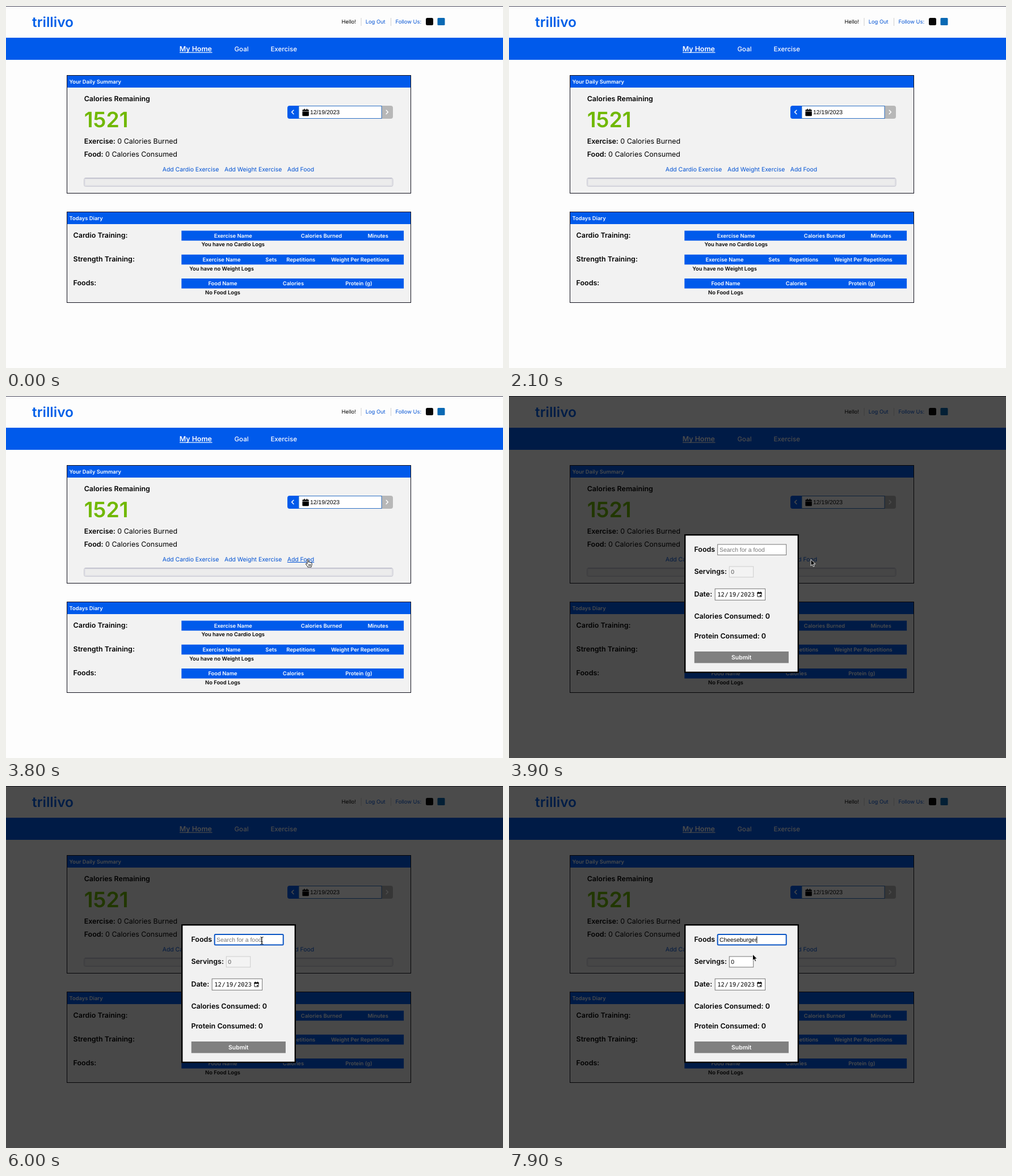
Recreate the animation shown at these times as an HTML page. Size 876 px wide and 639 px high, loop 8 s.

```html
<!DOCTYPE html>
<html lang="en">
<head>
<meta charset="utf-8">
<title>Calorie diary</title>
<style>
  html, body { margin: 0; width: 100%; height: 100%; overflow: hidden; background: #fdfdfd; }
  svg { display: block; width: 876px; height: 639px; }
  text { font: 400 12.48px Inter, sans-serif; fill: #000; text-rendering: geometricPrecision; }
  .b, .b text { font-weight: 600; }
  .s, .s text { font-size: 9.36px; }
  .m, .m text { font-size: 10.4px; }
  .c, .c text { text-anchor: middle; }
  .w, .w text { fill: #fff; }
  .link, .link text { fill: #0052d4; }
  .blue { fill: #005aeb; }
  .field { font-family: "Liberation Sans", Arial, sans-serif; font-size: 10.4px; }
  .mono { font-family: "DejaVu Sans Mono", monospace; font-size: 10.4px; }
  .box { fill: #fff; stroke: #767676; stroke-width: 1; }
  .panel { fill: #f2f2f2; stroke: #10101c; stroke-width: 1; }
  .chev { fill: none; stroke: #fff; stroke-width: 1.5; stroke-linecap: round; stroke-linejoin: round; }
</style>
</head>
<body>
<svg viewBox="0 0 876 639">
  <rect width="876" height="639" fill="#fdfdfd"/>
  <rect width="876" height="1" fill="#47475a"/>

  <g id="header">
    <text class="b" x="46" y="37" style="font-size:24.5px;fill:#005fe8">trillivo</text>
    <g class="s">
      <text x="591.5" y="30.8">Hello!</text>
      <g class="link">
        <text x="633.7" y="30.8">Log Out</text>
        <text x="686.6" y="30.8">Follow Us:</text>
      </g>
    </g>
    <path d="M626 21V35M678.5 21V35" stroke="#cfcfcf"/>
    <rect x="740" y="21" width="13" height="13" rx="2.5" fill="#060606"/>
    <rect x="760.5" y="21" width="13" height="13" rx="1.5" fill="#0a69b4"/>
  </g>

  <g id="nav">
    <rect class="blue" y="56" width="876" height="39"/>
    <text class="b w" x="305.7" y="80" style="font-size:12.4px">My Home</text>
    <rect x="306" y="81.4" width="57.5" height="1.2" fill="#fff"/>
    <g class="w" style="font-weight:500">
      <text x="402.5" y="80" style="font-size:11.5px;font-weight:500">Goal</text>
      <text x="466.4" y="80" style="font-size:11.5px;font-weight:500">Exercise</text>
    </g>
  </g>

  <g id="summary">
    <rect class="panel" x="107.5" y="122.5" width="606" height="208"/>
    <rect class="blue" x="108" y="123" width="605" height="21"/>
    <text class="b s w" x="111.6" y="137">Your Daily Summary</text>
    <text class="b" x="137.7" y="168">Calories Remaining</text>
    <text class="b" x="137.7" y="214" style="font-size:37.44px;fill:#70b800">1521</text>
    <text x="137.7" y="242.6"><tspan class="b">Exercise:</tspan> 0 Calories Burned</text>
    <text x="137.7" y="266"><tspan class="b">Food:</tspan> 0 Calories Consumed</text>
    <g class="m link">
      <text x="275.8" y="292">Add Cardio Exercise</text>
      <text x="385" y="292">Add Weight Exercise</text>
      <text id="addFood" x="495.8" y="292">Add Food</text>
    </g>
    <g fill="none">
      <rect x="137" y="303" width="545.5" height="16" rx="3" fill="#ececec"/>
      <rect x="139" y="305" width="541.5" height="12" rx="2" stroke="#e1e1e6" stroke-width="2"/>
      <rect x="137.5" y="303.5" width="544.5" height="15" rx="3" stroke="#c9c9d3"/>
      <path d="M139 304H680" stroke="#b4b4c4"/>
    </g>
    <path class="blue" d="M517 176H500a4 4 0 0 0-4 4V195a4 4 0 0 0 4 4H517z"/>
    <path d="M661 176H678a4 4 0 0 1 4 4V195a4 4 0 0 1-4 4H661z" fill="#b7b7b7"/>
    <rect x="516" y="176.5" width="146" height="22" fill="#fff" stroke="#2b6fc4"/>
    <path class="chev" d="M506.8 184L503.6 187.3L506.8 190.6M670.2 184L673.4 187.3L670.2 190.6"/>
    <path d="M523.6 183H525V181.4H526.6V183H529.6V181.4H531.2V183H532.6a1.2 1.2 0 0 1 1.2 1.2V185.4H522.4V184.2a1.2 1.2 0 0 1 1.2-1.2zM522.4 186.2H533.8V193a1.2 1.2 0 0 1-1.2 1.2H523.6a1.2 1.2 0 0 1-1.2-1.2z"/>
    <text class="field" x="536" y="191.2">12/19/2023</text>
  </g>

  <g id="diary">
    <rect class="panel" x="107.5" y="363.5" width="606" height="160"/>
    <rect class="blue" x="108" y="364" width="605" height="21"/>
    <text class="b s w" x="111.6" y="377.6">Todays Diary</text>
    <g class="b">
      <text x="118.6" y="409">Cardio Training:</text>
      <text x="118.6" y="451.2">Strength Training:</text>
      <text x="118.6" y="493.4">Foods:</text>
    </g>
    <g class="blue">
      <rect x="309.3" y="396.6" width="391.8" height="17.6"/>
      <rect x="309.3" y="438.8" width="391.8" height="17.6"/>
      <rect x="309.3" y="481" width="391.8" height="17.6"/>
    </g>
    <g class="b s c w">
      <text x="400.3" y="408.8">Exercise Name</text>
      <text x="556" y="408.8">Calories Burned</text>
      <text x="655.6" y="408.8">Minutes</text>
      <text x="380" y="451">Exercise Name</text>
      <text x="467.3" y="451">Sets</text>
      <text x="519.8" y="451">Repetitions</text>
      <text x="624.4" y="451">Weight Per Repetitions</text>
      <text x="382" y="493.2">Food Name</text>
      <text x="506.4" y="493.2">Calories</text>
      <text x="621.8" y="493.2">Protein (g)</text>
    </g>
    <g class="b s c">
      <text x="400.3" y="424.4">You have no Cardio Logs</text>
      <text x="380" y="466.6">You have no Weight Logs</text>
      <text x="382" y="508.8">No Food Logs</text>
    </g>
  </g>

  <g id="modal">
    <rect width="876" height="639" fill="#000" opacity=".7"/>
    <rect x="310.2" y="245.2" width="199.6" height="242.6" fill="#f1f1f1" stroke="#000" stroke-width="2.4"/>
    <g class="b">
      <text x="326.4" y="275">Foods</text>
      <text x="326.4" y="314">Servings:</text>
      <text x="326.4" y="354">Date:</text>
      <text x="326.4" y="393">Calories Consumed: 0</text>
      <text x="326.4" y="428.2">Protein Consumed: 0</text>
    </g>
    <rect id="search" class="box" x="367.7" y="262" width="121" height="18.6"/>
    <text id="query" class="field" x="371" y="275"></text>
    <rect id="caret" y="265.5" width="1" height="12"/>
    <rect id="servings" class="box" x="388.3" y="301" width="42.4" height="18.8"/>
    <text id="count" class="field" x="391.3" y="314">0</text>
    <rect class="box" x="363.2" y="340.3" width="88.4" height="20"/>
    <text class="mono" x="367.3" y="354">12<tspan dx=".8">/</tspan><tspan dx=".8">19</tspan><tspan dx=".8">/</tspan><tspan dx=".8">2023</tspan></text>
    <path d="M438 347.4H445V354.2H438z" fill="none" stroke="#111"/>
    <path d="M437.5 346.6H445.5V349H437.5zM438.8 345.6H440V347H438.8zM443 345.6H444.2V347H443zM442 351.4H444V353.2H442z"/>
    <rect x="326.7" y="451" width="166.2" height="20.4" fill="#808080"/>
    <text class="b m w c" x="409.8" y="465.2">Submit</text>
    <g id="option">
      <rect x="376.5" y="281.5" width="111" height="16" fill="#fff" stroke="#000"/>
      <text class="s c" x="431.8" y="293">Cheeseburger</text>
    </g>
  </g>

  <g id="cursor">
    <path id="arrow" d="M0 0V11.2L2.6 8.8L4.3 12.7L6.2 11.9L4.5 8.1H8z" fill="#000" stroke="#fff" stroke-width=".9"/>
    <path id="hand" d="M-1.1 1.1C-1.1-.3 1.1-.3 1.1 1.1V5C1.6 4.2 3 4.3 3.2 5.2C3.8 4.6 5 4.8 5.2 5.7C6 5.2 7 5.8 7 6.8V9C7 10.6 6 11.4 6 13.4H-.4C-.6 11.6-3 9.7-3.6 8.2C-4 7-2.6 6.4-1.1 8zM1.5 8.6V11.2M3.1 8.6V11.2M4.7 8.6V11.2" fill="#fff" stroke="#000" stroke-width=".9"/>
    <path id="beam" d="M-2.5-6.5Q0-6.5 0-4.8Q0-6.5 2.5-6.5M0-5V5M-2.5 6.5Q0 6.5 0 4.8Q0 6.5 2.5 6.5M-1.5 2H1.5" fill="none" stroke="#000"/>
  </g>
</svg>
<script>
  const LOOP = 8000, STEP = 100;
  const $ = id => document.getElementById(id);
  const show = (id, on) => { $(id).style.display = on ? "" : "none"; };
  const attrs = (el, set) => { for (const k in set) el.setAttribute(k, set[k]); };

  // pointer stops: time, x, y
  const path = [
    [2400, 860, 400], [2700, 715, 345], [3400, 533, 289], [3900, 532, 288.5],
    [4400, 532, 288.5], [5300, 451, 273], [6800, 451, 273], [7200, 430, 290],
    [7500, 430, 291], [7800, 429.5, 297]
  ];
  const typed = [[6300, "C"], [6400, "Ch"], [6600, "Che"], [7400, "Cheeseburger"]];
  const OPEN = 3900, FOCUS = 5600, PICK = 7400;

  function pointAt(t) {
    const i = path.findIndex(p => p[0] > t);
    if (i < 0) return path[path.length - 1].slice(1);
    if (i === 0) return path[0].slice(1);
    const [t0, x0, y0] = path[i - 1], [t1, x1, y1] = path[i];
    const u = (t - t0) / (t1 - t0), e = u * u * (3 - 2 * u);
    return [x0 + (x1 - x0) * e, y0 + (y1 - y0) * e];
  }

  function drawForm(t) {
    const focused = t >= FOCUS, picked = t >= PICK;
    const text = typed.reduce((s, [at, word]) => t >= at ? word : s, "");
    const query = $("query");
    show("modal", t >= OPEN);
    if (t < OPEN) return;
    query.textContent = text || "Search for a food";
    query.style.fill = text ? "#000" : "#757575";
    attrs($("search"), { rx: focused ? 1.5 : 0 });
    $("search").style.cssText = focused ? "stroke:#0a55c4;stroke-width:2" : "";
    const blink = Math.floor((t - FOCUS) / 400) % 2 === 0;
    show("caret", focused && (text || blink));
    attrs($("caret"), { x: 371 + (text ? query.getComputedTextLength() - .5 : 0) });
    show("option", text && !picked);
    $("servings").style.cssText = picked ? "" : "fill:#f3f3f3;stroke:#cdcdcd";
    $("count").style.fill = picked ? "#000" : "#545454";
  }

  function drawCursor(t) {
    const [x, y] = pointAt(t);
    const link = t >= 3300 && t < OPEN;
    const option = t >= 7100 && t < PICK;
    const beam = t >= 5100 && t < 7000;
    const typing = t >= typed[0][0] && t < 6800;
    show("cursor", t >= path[0][0] && !typing);
    show("hand", link || option);
    show("beam", beam);
    show("arrow", !link && !option && !beam);
    attrs($("cursor"), { transform: `translate(${x} ${y})` });
    $("addFood").style.textDecoration = link ? "underline" : "none";
  }

  const start = performance.now();
  function frame(now) {
    const t = Math.floor(Math.max(0, now - start) % LOOP / STEP) * STEP;
    drawForm(t);
    drawCursor(t);
    requestAnimationFrame(frame);
  }
  frame(start);
</script>
</body>
</html>
```
